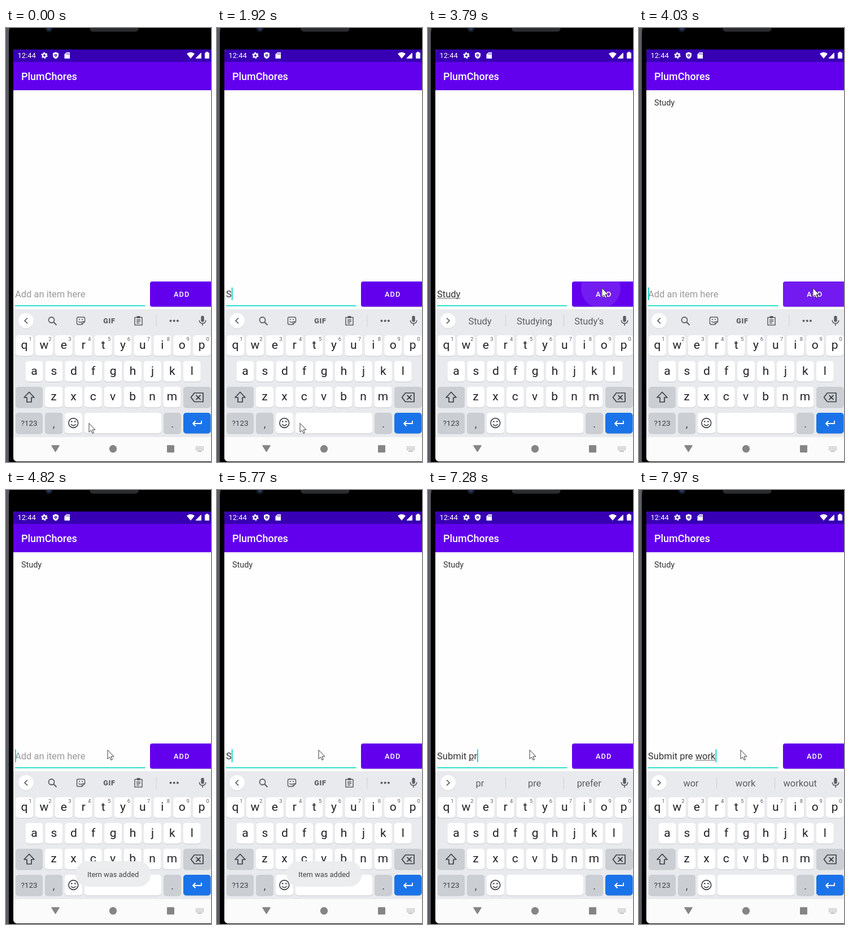
An HTML page that plays this animation: 363 px wide and 767 px high, repeating every 8 s.

```html
<!DOCTYPE html>
<html lang="en">
<head>
<meta charset="utf-8">
<title>To-do list</title>
<style>
  html, body { margin: 0; width: 100%; height: 100%; overflow: hidden; background: #000; }
  svg { display: block; font-family: Roboto, sans-serif; }
  text { white-space: pre; }
</style>
</head>
<body>
<svg id="stage" width="363" height="767" viewBox="0 0 363 767"></svg>
<script>
const LOOP = 8000, TEAL = '#03dac5', PURPLE = '#6200ee', INK = '#202124', SOFT = '#333', GREY = '#5a5d62';
const stage = document.getElementById('stage');

const rect = (x, y, w, h, fill, r = 0, more = '') =>
  `<rect x="${x}" y="${y}" width="${w}" height="${h}" rx="${r}" fill="${fill}" ${more}/>`;
const disc = (x, y, r, fill, more = '') => `<circle cx="${x}" cy="${y}" r="${r}" fill="${fill}" ${more}/>`;
const text = (x, y, size, fill, str, more = '') =>
  `<text x="${x}" y="${y}" font-size="${size}" fill="${fill}" ${more}>${str}</text>`;
const mid = (x, y, size, fill, str, more = '') => text(x, y, size, fill, str, 'text-anchor="middle" ' + more);
const line = (d, stroke = GREY, w = 1.7, fill = 'none') =>
  `<path d="${d}" stroke="${stroke}" stroke-width="${w}" fill="${fill}" stroke-linejoin="round"/>`;
const shape = (d, fill) => `<path d="${d}" fill="${fill}"/>`;

function frameAndBars() {
  return `<defs><linearGradient id="edge"><stop offset="0" stop-color="#56575e"/>
    <stop offset=".6" stop-color="#5f6067"/><stop offset="1" stop-color="#141416"/></linearGradient>
    <clipPath id="screen"><path d="M13 42Q13 38 17 38H363V766H21Q13 766 13 758Z"/></clipPath>
    <clipPath id="button"><rect x="255" y="448" width="120" height="44.5" rx="4"/></clipPath></defs>`
    + rect(0, 0, 363, 767, '#000')
    + shape('M0 0H7Q5 5 5 14V767H0Z', 'url(#edge)')
    + rect(148.5, -6, 86, 12.5, '#2b2c2f', 5)
    + disc(76, 1, 6.5, '#15181f') + disc(76, 1, 3.5, '#24375f')
    + '<g clip-path="url(#screen)">'
    + rect(13, 38, 350, 728, '#fefefe')
    + rect(13, 38, 350, 22, '#3700b3') + rect(13, 60, 350, 50, PURPLE)
    + text(20.4, 53, 13, '#fff', '12:44')
    + text(27, 92, 18, '#fff', 'PlumChores', 'font-weight="500"')
    + statusIcons() + keyboard() + navBar() + '</g>'
    + rect(16, 490, 230.5, 1.6, TEAL);
}

function statusIcons() {
  const gear = disc(68, 48.5, 3.1, 'none', 'stroke="#fff" stroke-width="2.4"')
    + disc(68, 48.5, 4.9, 'none', 'stroke="#fff" stroke-width="1.6" stroke-dasharray="2.7 2.43"');
  return gear
    + shape('M88 42.5L93 44.5V48.5Q93 52.5 88 54.5Q83 52.5 83 48.5V44.5Z', '#fff')
    + disc(88, 48.3, 2.3, '#3700b3') + disc(88, 48.3, 1, '#fff')
    + shape('M107 43H113V54H103.5V46.5Z', '#fff')
    + line('M107.3 44.5V47M109.3 44.5V47M111.3 44.5V47', '#3700b3', .9)
    + shape('M320 45.5Q327 40 334 45.5L327 54Z', '#fff')
    + line('M345.3 44.5V53.5H336Z', '#fff', 1) + shape('M341 48.3L345.5 43.5V54H335.5Z', '#fff')
    + rect(352, 43.5, 8, 10.5, '#fff', 1) + rect(354.3, 42, 3.4, 2, '#fff');
}

function key(x, y, w, fill = '#fff') {
  return rect(x, y + 1, w, 36.5, '#c4c7cb', 5) + rect(x, y, w, 36.5, fill, 5);
}

function keyboard() {
  const pitch = 34.9, dark = '#cbced3', mark = '#3c4043';
  const row = (letters, x0, y) => [...letters].map((c, i) => {
    const x = x0 + i * pitch;
    return key(x, y, 31) + mid(x + 15.5, y + 24, 21, INK, c);
  }).join('');
  const digits = [...'1234567890'].map((c, i) => mid(43 + i * pitch, 553, 9.5, GREY, c)).join('');
  return rect(13, 497, 350, 226, '#e8eaed')
    + row('qwertyuiop', 17, 543) + digits
    + row('asdfghjkl', 34.5, 588.5) + row('zxcvbnm', 69, 634)
    + key(17, 634, 48, dark) + key(314, 634, 48.5, dark)
    + key(17, 680, 48, dark) + key(69, 680, 31, dark) + key(104, 680, 31)
    + key(139, 680, 136) + key(279, 680, 31, dark) + key(314, 680, 48.5, '#1a73e8')
    + mid(41, 703.3, 13.5, mark, '?123')
    + mid(84.5, 706, 18, mark, ',') + mid(294.5, 706, 18, mark, '.')
    + line('M41 643.5L50 653H45V661H37V653H32Z', mark)
    + line('M333.5 645H349V660.5H333.5L327.5 652.7Z M336.5 648.8L344.5 656.8M344.5 648.8L336.5 656.8', mark)
    + line('M346 694V699H331.5M335.5 694.5L331 699L335.5 703.5', '#fff', 1.8)
    + disc(119.3, 698, 8.4, 'none', `stroke="${mark}" stroke-width="1.6"`)
    + disc(116.3, 695.5, 1.3, mark) + disc(122.3, 695.5, 1.3, mark)
    + line('M115 700.3Q119.300 705 123.600 700.3', mark, 1.5)
    + disc(35.5, 518, 13.7, '#d3d5d8') + disc(35.5, 517.3, 13.5, '#fff')
    + rect(345.3, 508.5, 5.4, 11, GREY, 2.7)
    + line('M342.3 516.5Q342.5 522 348 522Q353.5 522 353.7 516.5M348 522V526');
}

function navBar() {
  const g = '#858585';
  let dots = '';
  for (let r = 0; r < 3; r++)
    for (let c = 0; c < 6; c++) dots += rect(336 + c * 2.5, 739.5 + r * 2.6, 1.5, 1.5, '#a5a5a5');
  return rect(13, 723, 350, 43, '#fbfbfb')
    + line('M81 738H94L87.5 748.5Z', g, 1.5, g) + disc(189.5, 743.8, 6.7, g)
    + rect(285, 737.3, 13, 13, g, 1) + dots + rect(339, 747.3, 8, 1.4, '#a5a5a5');
}

const toolbar = line('M38 512.5L33 517.3L38 522.1')
  + disc(80.5, 516, 5, 'none', `stroke="${GREY}" stroke-width="1.8"`) + line('M84 519.5L89.5 525', GREY, 2.1)
  + line('M128 511H137Q139.5 511 139.5 513.5V519L134.5 524H128Q125.5 524 125.5 521.5V513.5Q125.5 511 128 511Z M134.5 524V521Q134.5 519 136.5 519H139.5 M128.5 518.5Q131 521.5 133.5 519', GREY, 1.5)
  + disc(130, 515, 1.1, GREY) + disc(135, 515, 1.1, GREY)
  + mid(183, 521.5, 12.5, GREY, 'GIF', 'font-weight="900" letter-spacing=".8"')
  + line('M228 511.5H241V525H228Z M231 515.8H238M231 518.6H238M231 521.4H236', GREY, 1.5)
  + rect(231.5, 509, 6, 4, GREY, 1)
  + rect(265.5, 507, 1, 21, '#d0d2d6')
  + [291.5, 297.7, 303.9].map(x => disc(x, 517.5, 2, GREY)).join('');

const suggestions = list => line('M33 512.5L38 517.3L33 522.1')
  + rect(137, 507, 1, 21, '#ccced2') + rect(240, 507, 1, 21, '#ccced2')
  + list.split('|').map((w, i) => mid(92 + i * 96.6, 524, 16.4, GREY, w)).join('');

// [time, typed text, underline from, underline to, caret shown, suggestions]
const typing = [
  [0, '', 0, 0, 0], [280, '', 0, 0, 1], [680, '', 0, 0, 0], [1200, '', 0, 0, 1],
  [1920, 'S', 0, 0, 1], [2170, 'S', 0, 1, 1],
  [2320, 'St', 0, 1, 1, 'St|Still|Sit'], [2600, 'Stu', 0, 3, 1, 'Stu|Stuff|Sit'],
  [2750, 'Study', 0, 4, 1, 'Stud|Study|Studied'], [3000, 'Study', 0, 5, 1, 'Study|Studying|Study\'s'],
  [3400, 'Study', 0, 5, 0, 'Study|Studying|Study\'s'],
  [4030, '', 0, 0, 1], [4420, '', 0, 0, 0], [4820, '', 0, 0, 1],
  [5100, 'S', 0, 0, 1], [5250, 'Sy', 0, 1, 1, 'Sy|Sync|Sys'], [5370, 'S', 0, 1, 1, 'S|So|She'],
  [5490, '', 0, 0, 1], [5770, 'S', 0, 0, 1], [5890, 'Su', 0, 1, 1, 'Su|Sure|Sun'],
  [6010, 'Sub', 0, 2, 1, 'Sub|Subs|Subway'], [6130, 'Subm', 0, 3, 1, 'Subm|Submit|Submitted'],
  [6250, 'Submi', 0, 4, 1, 'Subm|Submit|Submitted'], [6370, 'Submit', 0, 5, 1, 'Submi|Submit|Submitted'],
  [6610, 'Submit ', 0, 6, 1, 'Submi|Submit|Submitted'], [6760, 'Submit ', 0, 0, 1, 'the|a|your'],
  [7130, 'Submit p', 0, 0, 1, 'the|a|your'], [7280, 'Submit pr', 7, 8, 1, 'pr|pre|prefer'],
  [7400, 'Submit pre', 7, 10, 1, 'pre|prep|prefer'], [7550, 'Submit pre w', 0, 0, 1, 'w|with|was'],
  [7670, 'Submit pre wo', 11, 13, 1, 'wo|work|workout'],
  [7820, 'Submit pre work', 11, 15, 1, 'wo|work|workout'], [7970, 'Submit pre work', 11, 15, 1, 'wor|work|workout']
];
const pointer = [[0, 147, 699], [3400, 196, 626], [3520, 272, 514], [3640, 308, 460], [4150, 242, 460], [4270, 180, 460]];
const ripple = [[0, 0, 0], [3790, 35, .11], [3910, 60, .13], [4030, 95, .1], [4150, 110, .04], [4270, 0, 0]];
const toast = [[0, 0], [4150, .35], [4270, .75], [4420, 1], [6130, .7], [6250, .3], [6370, 0]];
const at = (steps, t) => steps.findLast(s => s[0] <= t);

const pen = document.createElement('canvas').getContext('2d');
pen.font = '16.5px Roboto, sans-serif';
const width = s => pen.measureText(s).width;

function draw(t) {
  const [, typed, from, to, caret, words] = at(typing, t);
  const [, px, py] = at(pointer, t);
  const [, radius, glow] = at(ripple, t);
  const [, shown] = at(toast, t);
  const x = n => 16 + width(typed.slice(0, n));
  return (t >= 4030 ? text(27, 137, 14.4, SOFT, 'Study') : '')
    + (typed ? text(16, 476, 16.5, SOFT, typed) : text(16, 476, 16.5, '#999', 'Add an item here'))
    + (to ? rect(x(from), 477.2, x(to) - x(from), 1, '#666') : '')
    + (caret ? rect(x(typed.length), 458.5, 1.8, 22.5, TEAL) : '')
    + rect(255, 449, 120, 44.5, '#d4d4d8', 4) + rect(255, 448, 120, 44.5, PURPLE, 4)
    + disc(306, 460, radius, '#fff', `opacity="${glow}" clip-path="url(#button)"`)
    + text(297, 475, 12.8, '#fff', 'ADD', 'font-weight="500" letter-spacing="1.1"')
    + (words ? suggestions(words) : toolbar)
    + `<g opacity="${shown}">` + rect(123, 656, 133.5, 45, '#ebecee', 22, 'opacity=".95"')
    + text(144, 684, 12.9, '#444', 'Item was added') + '</g>'
    + `<g transform="translate(${px} ${py})">`
    + line('M0 -.5V15.3L3.5 12L6 17.3L8.300 16.3L6 11H11Z', '#222', .9, '#fff') + '</g>';
}

stage.innerHTML = frameAndBars() + '<g id="live"></g>';
const live = document.getElementById('live');
const start = performance.now();
let last = '';
function tick() {
  const next = draw((performance.now() - start) % LOOP);
  if (next !== last) live.innerHTML = last = next;
  requestAnimationFrame(tick);
}
tick();
</script>
</body>
</html>
```
